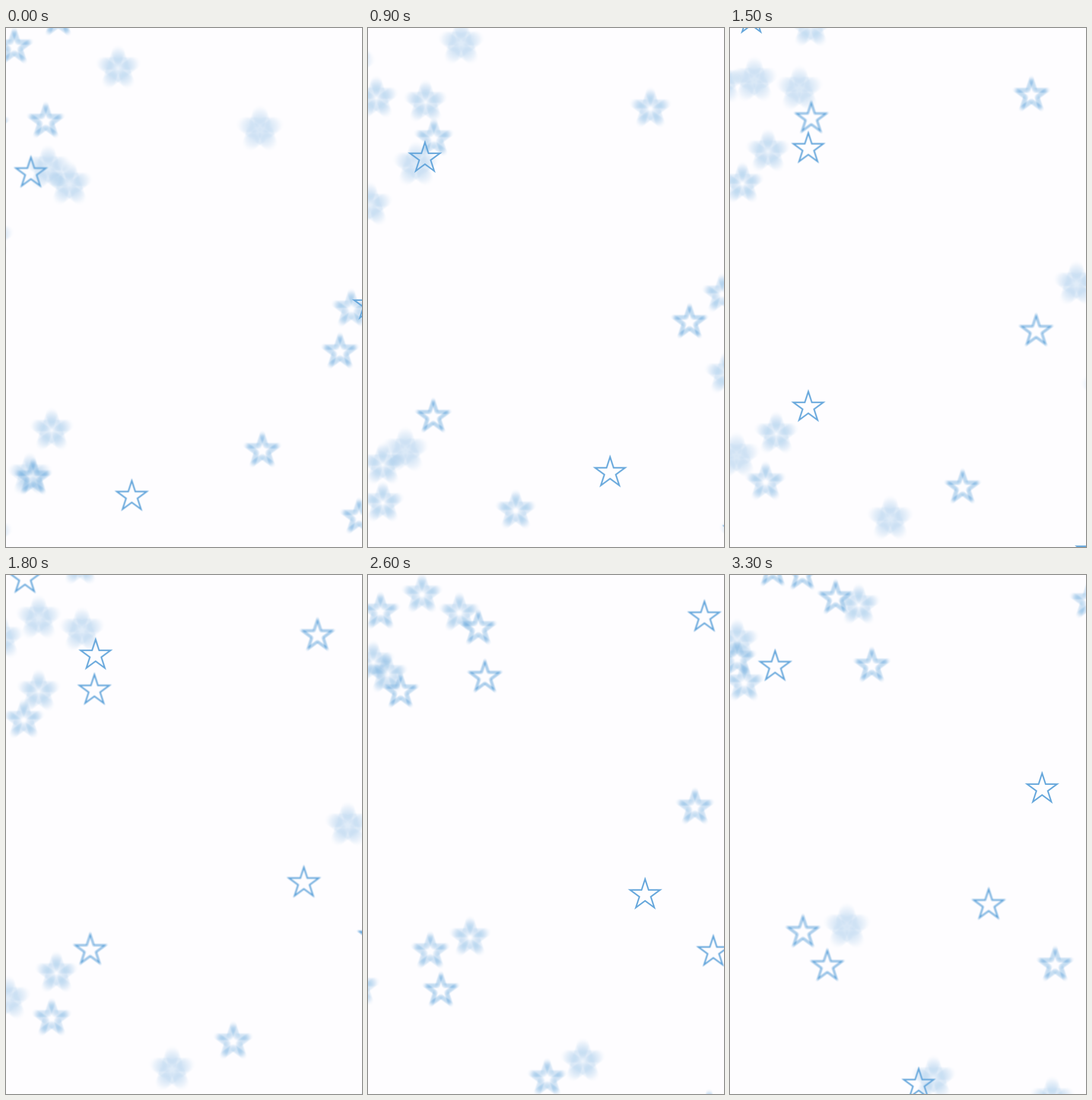
An HTML page with a canvas that plays this animation: 600x873 px, repeating every 3.4 s.

```html
<!DOCTYPE html>
<html>
<head>
<meta charset="utf-8">
<style>
html, body { margin: 0; height: 100%; overflow: hidden; background: #fefdff; }
canvas { display: block; }
</style>
</head>
<body>
<canvas id="stage" width="600" height="873"></canvas>
<script>
const ctx = document.getElementById('stage').getContext('2d');
const STEP = 100, STEPS = 34, SIZE = 96, MID = SIZE / 2, MAX_BLUR = 13;
const INK = [104, 168, 220];

// Each star: x and y at the start, x and y at the end,
// then optionally depth at start and end, and easing of the path.
const stars = [
  [432, 711, 343, 847, -5, 15],
  [212, 788, 318, 857, 1, 25, 0.38],
  [582, 473, 436, 555, 6.5, -2],
  [563, 545, 713, 680],
  [709, 551, 548, 656, -10.5, 4.5],
  [612, 466, 526, 360, 0, 26, -0.5],
  [595, 823, 720, 920],
  [650, 795, 562, 982, -3, 4],
  [695, 961, 543, 882, -15, 11],
  [77, 677, 197, 592, -10, 13],
  [40, 752, 123, 601, 10, 23],
  [-27, 852, 164, 658, 11, 2.5],
  [46, 757, -32, 676],
  [428, 171, 605, 44, 13, -5.5],
  [42, 244, 239, 153, -1.8, 4.4],
  [71, 236, 217, 51, -12, 9],
  [67, 157, 178, 39],
  [-26, 163, 122, -2],
  [107, 263, 12, 141, 11.5, 20],
  [-25, 352, 76, 154, 15, 1.2],
  [189, 68, 72, -86, 11, 22],
  [88, -15, 0, -140],
  [56, -120, 12, 111, -8.3, 10],
  [14, 32, -150, 110],
  [-46, 15, 24, 182, 10, 19],
  [-8, -248, 72, -8]
];

function newLayer() {
  const layer = document.createElement('canvas');
  layer.width = layer.height = SIZE;
  return layer.getContext('2d');
}

function outlineAlpha() {
  const g = newLayer();
  for (let i = 0; i < 10; i++) {
    const r = i % 2 ? 10.1 : 26.5, a = i * Math.PI / 5;
    g.lineTo(MID + r * Math.sin(a), MID - r * Math.cos(a));
  }
  g.closePath();
  g.lineWidth = 2.5;
  g.stroke();
  return g.getImageData(0, 0, SIZE, SIZE).data.filter((v, i) => i % 4 === 3);
}

const outline = outlineAlpha();
const sprites = {};

// Lens blur: spread every outline pixel over a disc.
function makeSprite(radius) {
  const disc = [], reach = Math.ceil(radius);
  let total = 0;
  for (let y = -reach; y <= reach; y++) {
    for (let x = -reach; x <= reach; x++) {
      const w = Math.min(1, Math.max(0, radius + 0.6 - Math.hypot(x, y)));
      if (w) disc.push([y * SIZE + x, w]);
      total += w;
    }
  }
  const sum = new Float32Array(SIZE * SIZE);
  outline.forEach((v, i) => {
    if (v) for (const [shift, w] of disc) sum[i + shift] += v * w;
  });
  const g = newLayer(), img = g.createImageData(SIZE, SIZE);
  const gain = (1 + radius * 0.03) / total;
  sum.forEach((v, i) => img.data.set([...INK, v * gain], i * 4));
  g.putImageData(img, 0, 0);
  return g.canvas;
}

function sprite(radius) {
  const key = Math.round(radius * 4) / 4;
  return sprites[key] ||= makeSprite(key);
}

const mix = (a, b, u) => a + (b - a) * u;

// Depth folds back at the strongest blur; zero is in focus.
function blurAt(depth) {
  const z = Math.abs(depth);
  return z > MAX_BLUR ? Math.abs(2 * MAX_BLUR - z) : z;
}

function draw(now) {
  const u = Math.floor(now / STEP) % STEPS / (STEPS - 1);
  ctx.fillStyle = '#fefdff';
  ctx.fillRect(0, 0, 600, 873);
  for (const [x0, y0, x1, y1, z0 = 5, z1 = 22, ease = 0] of stars) {
    const p = u + ease * u * (1 - u);
    const x = Math.round(mix(x0, x1, p)), y = Math.round(mix(y0, y1, p));
    ctx.drawImage(sprite(blurAt(mix(z0, z1, u))), x - MID, y - MID);
  }
}

const start = performance.now();
function tick() {
  draw(performance.now() - start);
  requestAnimationFrame(tick);
}
tick();
</script>
</body>
</html>
```
